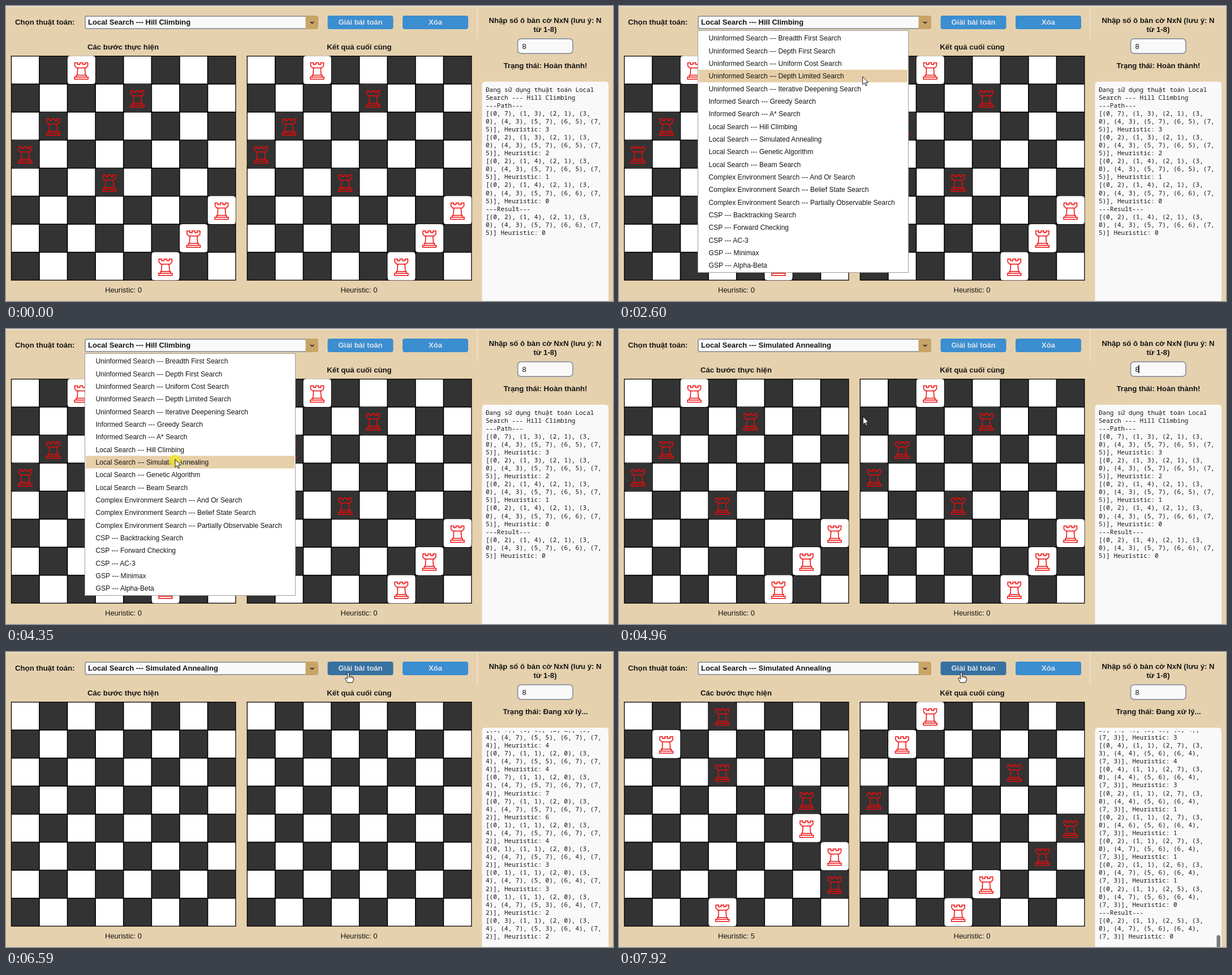
An HTML page that plays this animation: 1073 by 522 pixels, repeating every 7.99 s.

```html
<!DOCTYPE html>
<html lang="vi">
<head>
<meta charset="utf-8">
<title>Search demo</title>
<style>
html, body { margin: 0; width: 100%; height: 100%; overflow: hidden; background: #e6d1ae; }
svg { display: block; width: 1073px; height: 522px; }
text { font: 13px "Liberation Sans", Arial, sans-serif; fill: #151515; }
.b { font-weight: bold; font-size: 13.2px; }
.mid { text-anchor: middle; }
.btn { font-weight: bold; fill: #dce4ee; text-anchor: middle; }
#items text { font-size: 12.1px; }
#log text { font: 11px "Noto Sans Mono", "DejaVu Sans Mono", monospace; }
.field { fill: #f9f9fa; stroke: #979da2; stroke-width: 2; }
</style>
</head>
<body>
<svg viewBox="0 0 1073 522">
  <defs>
    <clipPath id="logClip"><rect x="842" y="140" width="223" height="382"/></clipPath>
    <path id="rook" fill="none" stroke="#f00808" stroke-width="1.5" d="M-11.5-14h5v3h4v-3h5v3h4v-3h5v5.5l-3.5 3.5h-16l-3.5-3.5zM-6.3-5L-7.2 8M6.3-5L7.2 8M-9 8h18v3.3h-18zM-12 11.3h24v3.7h-24z"/>
  </defs>
  <rect width="1073" height="522" fill="#e6d1ae"/>
  <path d="M0 .5H1073M833 0V57" stroke="#eee5d6" stroke-width="1.4"/>

  <text class="b" x="16" y="33">Chọn thuật toán:</text>
  <rect class="field" x="140" y="18" width="400" height="22" rx="3"/>
  <path id="arrow" d="M529.5 17H548a4 4 0 0 1 4 4V37a4 4 0 0 1-4 4H529.5Z"/>
  <path d="M538 27.8l3.2 2.6 3.2-2.6" fill="none" stroke="#222" stroke-width="1.6"/>
  <text class="b" id="choice" x="145" y="33" style="font-size:13.05px"></text>
  <rect id="solve" x="568.5" y="17" width="116" height="24" rx="4"/>
  <text class="btn" x="626.5" y="33">Giải bài toán</text>
  <rect x="701" y="17" width="116" height="24" rx="4" fill="#3b8ed0"/>
  <text class="btn" x="759" y="33">Xóa</text>

  <text class="b mid" x="207" y="77">Các bước thực hiện</text>
  <text class="b mid" x="624.5" y="77">Kết quả cuối cùng</text>
  <g id="left"></g>
  <g id="right"></g>
  <text id="hLeft" x="175" y="506.5"></text>
  <text x="591.5" y="506.5">Heuristic: 0</text>

  <text class="b mid" x="953" y="29.5">Nhập số ô bàn cờ NxN (lưu ý: N</text>
  <text class="b mid" x="953" y="45.5">từ 1-8)</text>
  <rect class="field" x="904.5" y="58" width="97.5" height="26" rx="6"/>
  <text x="912.5" y="75.5">8</text>
  <rect id="caret" x="918" y="64" width="1.7" height="14" fill="#111"/>
  <text class="b mid" id="status" x="953.5" y="110"></text>
  <rect x="841.5" y="134" width="223.5" height="400" rx="5" fill="#f9f9fa"/>
  <g id="log" clip-path="url(#logClip)"></g>
  <rect id="thumb" x="1056.5" width="6.5" height="480" rx="3.2" fill="#7a7a7a"/>

  <g id="menu">
    <rect x="139.5" y="43.5" width="372" height="428" fill="#fff" stroke="#9c9c9c"/>
    <rect id="hot" x="141" width="369" height="22.3" fill="#e6cfa9"/>
    <g id="items"></g>
  </g>
  <circle id="halo" r="10.5" fill="#f2e330" opacity=".88"/>
  <g id="cursor" fill="#fff" stroke="#111" stroke-linejoin="round">
    <path id="pointer" d="M.5 .5V14.6L3.7 11.6 5.9 16.6 8 15.7 5.9 10.8H10.3Z"/>
    <path id="hand" d="M-1.5 1.3Q0-1 1.5 1.3V7Q3 5.8 4.4 7.4 5.8 6.6 7 8.2 9.3 7.8 9.3 10V13.5L7.6 18H-1.6L-5.3 11.8Q-5.6 9.3-3.4 10L-1.5 12ZM1.5 7V10M4.4 7.4V10M7 8.2V10.5"/>
  </g>
</svg>
<script>
const LOOP = 7990, CELL = 49.6, LINE = 14.08, ROW = 22.33;
const $ = id => document.getElementById(id);
const show = (id, on) => { $(id).style.display = on ? "" : "none"; };

function add(parent, tag, attrs, text) {
  const el = document.createElementNS("http://www.w3.org/2000/svg", tag);
  for (const k in attrs) el.setAttribute(k, attrs[k]);
  if (text !== undefined) el.textContent = text;
  return parent.appendChild(el);
}

// Run fn only when the value behind a key has changed.
const seen = {};
function onChange(key, value, fn) {
  if (seen[key] === value) return;
  seen[key] = value;
  fn(value);
}

const groups = {
  "Uninformed Search": ["Breadth First Search", "Depth First Search", "Uniform Cost Search",
    "Depth Limited Search", "Iterative Deepening Search"],
  "Informed Search": ["Greedy Search", "A* Search"],
  "Local Search": ["Hill Climbing", "Simulated Annealing", "Genetic Algorithm", "Beam Search"],
  "Complex Environment Search": ["And Or Search", "Belief State Search", "Partially Observable Search"],
  "CSP": ["Backtracking Search", "Forward Checking", "AC-3"],
  "GSP": ["Minimax", "Alpha-Beta"]
};
const options = Object.entries(groups).flatMap(([g, names]) => names.map(n => `${g} --- ${n}`));
options.forEach((o, i) => add($("items"), "text", { x: 158.5, y: 61.3 + i * ROW }, o));
const HILL = 7, ANNEAL = 8;

// A state is a string of eight column digits, one for each row.
const conflicts = s => [...s].reduce((n, c, i) => n + [...s.slice(i + 1)].filter(d => d === c).length, 0);
const coords = s => "[" + [...s].map((c, r) => `(${r}, ${c})`).join(", ") + "]";

let seed = 11;
const rand8 = () => (seed = (seed * 1103515245 + 12345) % 2147483648, (seed >> 16) & 7);

const hillPath = ["73103755", "23103755", "24103755", "24103765"];
const path = ["31526245", "31526243", "31526243".replace("5", "0"), "31066243", "31066273", "31066773", "31366773"];
function wander(target, steps) {
  for (let left = steps; left > 0; left--) {
    const s = [...path[path.length - 1]];
    const r = left <= 8 ? 8 - left : rand8();
    s[r] = left <= 8 ? target[r] : rand8();
    path.push(s.join(""));
  }
}
wander("71247574", 21);
path.push("71047574", "71047774", "71047772", "11047772", "11047742", "11047042", "11047342", "31047342");
const MARK = path.length;
wander("41754643", 77);
path.push("41734643", "41704643", "21704643", "21706643", "21707643", "21607643", "21507643");
const hillEnd = hillPath[3], annealEnd = path[path.length - 1];

function wrap(text, width) {
  const out = [];
  let line = "";
  for (const word of text.split(" ")) {
    if (line && line.length + 1 + word.length > width) { out.push(line); line = word; }
    else line = line ? line + " " + word : word;
  }
  return [...out, line];
}

function logLines(option, states, done, width) {
  const text = [`Đang sử dụng thuật toán ${options[option]}`, "---Path---",
    ...states.map(s => `${coords(s)}, Heuristic: ${conflicts(s)}`)];
  if (done) {
    const s = states[states.length - 1];
    text.push("---Result---", `${coords(s)} Heuristic: ${conflicts(s)}`);
  }
  return text.flatMap(p => wrap(p, width));
}

function drawLog(lines) {
  const log = $("log"), n = lines.length;
  const top = Math.min(151.5, 507 - (n - 1) * LINE);
  log.replaceChildren();
  for (let i = Math.max(0, n - 28); i < n; i++)
    add(log, "text", { x: 848, y: top + i * LINE }, lines[i]);
  $("thumb").setAttribute("y", 530 - 10640 / n);
}

function makeBoard(id, x) {
  const g = $(id);
  g.setAttribute("transform", `translate(${x} 88.5)`);
  add(g, "rect", { x: -.5, width: 8 * CELL + 1, height: 8 * CELL + 1, y: -.5 });
  for (let i = 0; i < 64; i++) {
    const r = i >> 3, c = i & 7;
    add(g, "rect", { x: c * CELL + .8, y: r * CELL + .8, width: CELL - 1.6, height: CELL - 1.6,
      fill: (r + c) % 2 ? "#333" : "#fff" });
  }
  return add(g, "g", {});
}
const boards = { left: makeBoard("left", 9.3), right: makeBoard("right", 426.2) };

function drawBoard(id, state) {
  boards[id].replaceChildren();
  [...state].forEach((c, r) => {
    const x = c * CELL, y = r * CELL;
    add(boards[id], "rect", { x: x + .2, y: y - .2, width: CELL - .4, height: CELL + .2, rx: 5,
      fill: (r + +c) % 2 ? "#333" : "#fff" });
    add(boards[id], "use", { href: "#rook", x: x + 24.6, y: y + 26 });
  });
}

// Mouse track: time, x, y
const track = [
  [200, 980, 466], [480, 765, 262], [690, 585, 85], [830, 515, 22], [970, 528, 32], [1100, 528, 32], [1170, 533, 29],
  [2250, 533, 29], [2320, 510, 46], [2600, 430.5, 124], [2880, 345, 250], [3090, 318, 222],
  [3500, 306, 233], [3920, 302, 230], [4060, 298.5, 230], [4750, 298.5, 230],
  [4960, 430, 155], [5100, 560, 70], [5240, 605, 36], [LOOP, 605, 36]
];
function mouseAt(t) {
  const i = Math.max(1, track.findIndex(k => k[0] > t));
  const a = track[i - 1], b = track[i];
  const f = Math.max(0, (t - a[0]) / (b[0] - a[0]));
  return [a[1] + (b[1] - a[1]) * f, a[2] + (b[2] - a[2]) * f];
}

function render(t) {
  const within = (a, b) => t >= a && t < b;
  const started = t >= 6160;
  const [mx, my] = mouseAt(t);

  show("cursor", t >= 200);
  $("cursor").setAttribute("transform", `translate(${mx} ${my})`);
  const onButton = t >= 5175;
  show("pointer", !onButton);
  show("hand", onButton);
  show("halo", within(1790, 1860) || within(4280, 4420) || within(5900, 6030));
  $("halo").setAttribute("cx", mx);
  $("halo").setAttribute("cy", my + 3);

  $("arrow").setAttribute("fill", within(900, 1860) ? "#b18c6c" : "#c8a467");
  $("solve").setAttribute("fill", onButton && !within(6030, 6160) ? "#36719f" : "#3b8ed0");
  $("choice").textContent = options[t < 4420 ? HILL : ANNEAL];
  $("status").textContent = "Trạng thái: " + (started ? "Đang xử lý..." : "Hoàn thành!");
  show("caret", within(1860, 6160) ? (t < 1920 || (t - 1920) % 900 < 600) : within(7020, 7620));

  show("menu", within(1860, 4420));
  const hot = t < 2320 ? HILL : Math.max(0, Math.floor((my - 45.8) / ROW));
  $("hot").setAttribute("y", 45.8 + hot * ROW);

  // The log grows by seven states every 70 ms.
  const tick = Math.floor((t - 6590) / 70);
  const count = started ? Math.max(0, Math.min(path.length, MARK + 7 * tick)) : -1;
  const narrow = t >= 6660, done = t >= 7430;
  show("thumb", narrow);
  onChange("log", [count, narrow, done].join(), () => drawLog(started
    ? logLines(ANNEAL, path.slice(0, count), done, narrow ? 30 : 31)
    : logLines(HILL, hillPath, true, 31)));

  const step = Math.min(6, Math.floor((t - 7500) / 70));
  const state = step >= 0 ? path[step] : started ? "" : hillEnd;
  onChange("left", state, s => {
    drawBoard("left", s);
    $("hLeft").textContent = "Heuristic: " + conflicts(s);
  });
  onChange("right", step >= 0 ? annealEnd : started ? "" : hillEnd, s => drawBoard("right", s));
}

function frame() {
  render(performance.now() % LOOP);
  requestAnimationFrame(frame);
}
frame();
</script>
</body>
</html>
```
